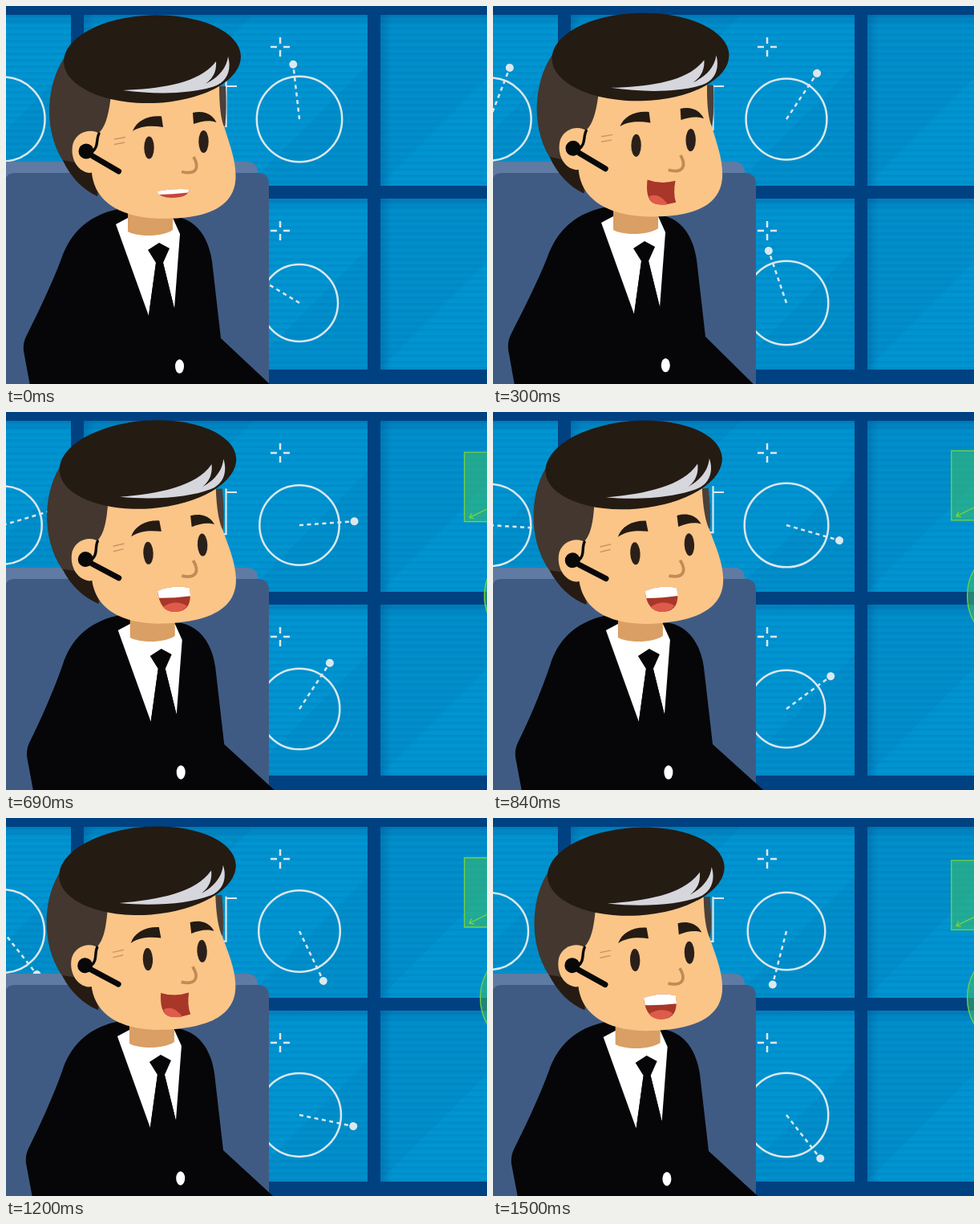
Animation, 600 px wide and 471 px high, one loop 1.53 s. Source, as an HTML page:

```html
<!DOCTYPE html>
<html lang="en">
<head>
<meta charset="utf-8">
<title>Control room call</title>
<style>
html, body { margin: 0; width: 100%; height: 100%; overflow: hidden; background: #004182; }
svg { display: block; width: 600px; height: 471px; }
</style>
</head>
<body>
<svg viewBox="0 0 600 471" xmlns="http://www.w3.org/2000/svg">
  <defs>
    <pattern id="scan" width="8" height="8" patternUnits="userSpaceOnUse">
      <rect width="8" height="3" y="2" fill="#0070b4" opacity=".2"/>
      <rect width="8" height="1" y="5" fill="#0070b4" opacity=".1"/>
    </pattern>
    <linearGradient id="shadeX"><stop stop-color="#00508f" stop-opacity=".35"/><stop offset="1" stop-color="#00508f" stop-opacity="0"/></linearGradient>
    <linearGradient id="shadeY" x2="0" y2="1"><stop stop-color="#00508f" stop-opacity=".3"/><stop offset="1" stop-color="#00508f" stop-opacity="0"/></linearGradient>
    <clipPath id="panes"><path d="M-273 11H81V224H-273ZM97 11H451V224H97ZM467 11H821V224H467ZM-273 240H81V453H-273ZM97 240H451V453H97ZM467 240H821V453H467Z"/></clipPath>
  </defs>

  <rect width="600" height="471" fill="#004182"/>
  <g id="wall" clip-path="url(#panes)"></g>

  <g id="screens" fill="none" stroke="#dce8ee" stroke-width="2.5">
    <path d="M330 51h8m8 0h8M342 39v8m0 8v8M330 280h8m8 0h8M342 268v8m0 8v8"/>
    <path id="bracket" stroke-width="2.2"/>
  </g>

  <g fill="#3cbf68" fill-opacity=".55" stroke="#78d33c" stroke-width="1.300">
    <g id="card">
      <path d="M0 0H80V86.500H0Z"/>
      <path d="M6 81.500L36 67M6 81.500l3-5.500M6 81.500l6 1" fill="none"/>
    </g>
    <circle id="disc" cx="656.600"/>
  </g>

  <path d="M0 194H300Q314 194 314 208V230H0Z" fill="#5f7ba4"/>
  <path d="M-1 471V220Q-1 208 11 208H314Q328 208 328 222V471Z" fill="#405b83"/>

  <path id="jacket" fill="#060608"/>
  <g id="shirt">
    <path d="M137 272L152 264H208L217 284L210 377L196 320H187L178 386Z" fill="#fff"/>
    <path d="M152 250H208V279C196 288 164 288 152 281Z" fill="#d99f64"/>
    <path d="M177 304L191 295L204 302L196 320L210 377L206 392H177L187 320Z" fill="#060608"/>
  </g>
  <ellipse id="button" rx="5.500" ry="8.700" fill="#fff"/>

  <g id="head">
    <path d="M76 60C52 90 44 150 71 193C81 212 96 228 114 237L140 180V90Z" fill="#43372f"/>
    <path d="M71 192C80 213 96 229 114 237L112 200Z" fill="#261b13"/>
    <path d="M258 100H274C275 120 275 136 273 151L262 140Z" fill="#4b4039"/>
    <path d="M132 100H266C266 125 268 142 273 153C279 173 286.500 191 286.500 212C286.500 250 252 265 196 265C148 265 111 247 107 208L114 160C124 152 129 136 132 100Z" fill="#fbc588"/>
    <path d="M118 160C108 152 90 155 84 170C79 186 87 206 104 208L118 206Z" fill="#fbc588"/>
    <ellipse cx="182.500" cy="66.200" rx="110.500" ry="54.800" transform="rotate(-2 182.500 66)" fill="#241b13"/>
    <path d="M146 105C195 103 242 96 262 69C263 83 257 91 249 97C263 90 275 79 277 63C282 80 275 95 260 100C234 109 190 111 146 105Z" fill="#d6d6dd"/>
    <g id="brows" fill="#241b13">
      <path d="M158 156C163 143 177 136 194 137.500L196 151C182 149 169 149 158 156Z"/>
      <path d="M233 133C246 130 257 134 262.500 145C254 142 245 143 234 147Z"/>
    </g>
    <ellipse cx="178.500" cy="176.500" rx="6.200" ry="14" fill="#2a2019"/>
    <ellipse cx="246.500" cy="169" rx="6.200" ry="14" fill="#2a2019"/>
    <path d="M234 188C242 202 237 211 219 206.500" fill="none" stroke="#c18b53" stroke-width="3.800"/>
    <path d="M135 166L149 163.500M135 172.500L148 170" stroke="#c99663" stroke-width="1.500"/>
    <g fill="none" stroke="#080808" stroke-linecap="round">
      <path d="M116 159C112 166 116 176 107 182" stroke-width="3.400"/>
      <path d="M108 187L140.500 206" stroke-width="7"/>
    </g>
    <circle cx="100" cy="181" r="9.500" fill="#080808"/>

    <g class="mouth">
      <path d="M188 231Q208 227 229 228.500Q227 239 207 239Q192 239 188 231Z" fill="#c4473a"/>
      <path d="M188 231Q208 227 229 228.500L227 232.500Q208 234.500 191 235Z" fill="#fff"/>
    </g>
    <g class="mouth">
      <path d="M193 219Q210 225 228 220Q225 236 229 247Q206 253 198 246Q191 239 193 219Z" fill="#a83629"/>
      <path d="M195 240Q206 234 217 247Q219 249 218 250Q203 251 198 246Z" fill="#de5b4b"/>
    </g>
    <g class="mouth"><ellipse cx="214" cy="235" rx="7.500" ry="15.500" fill="#a6342a"/></g>
    <g class="mouth">
      <path d="M188 224Q208 217 228 222Q232 251 210 251Q190 251 188 224Z" fill="#a83629"/>
      <path d="M194 244Q210 235 224 244Q219 251 210 251Q199 251 194 244Z" fill="#de5b4b"/>
      <path d="M188 224Q208 217 228 222L229 232Q208 234 189.500 233Z" fill="#fff"/>
    </g>
  </g>
</svg>
<script>
const LOOP = 1530, STEP = 30, PULSE = 920;
const $ = id => document.getElementById(id);
const clamp = v => Math.min(1, Math.max(0, v));
const easeOut = v => 1 - (1 - clamp(v)) ** 3;
const wave = (t, peak, period = PULSE) => Math.cos(2 * Math.PI * (t - peak) / period);

function add(parent, tag, attrs) {
  const el = document.createElementNS("http://www.w3.org/2000/svg", tag);
  for (const k in attrs) el.setAttribute(k, attrs[k]);
  return parent.appendChild(el);
}

function buildWall() {
  const wall = $("wall"), rect = (x, y, width, height, fill) =>
    add(wall, "rect", { x, y, width, height, fill });
  for (const y of [11, 240]) for (const x of [-273, 97, 467]) {
    rect(x, y, 354, 213, "#008fca");
    add(wall, "path", {
      d: `M${x + 212} ${y}L${x - 1} ${y + 213}H${x + 204}L${x + 417} ${y}Z`,
      fill: "#00a4e0", opacity: .3
    });
    rect(x, y, 354, 213, "url(#scan)");
    rect(x, y, 14, 213, "url(#shadeX)");
    rect(x, y, 354, 14, "url(#shadeY)");
  }
}

// Radar dials: centre, start angle of the hand, time of largest ring
const dials = [[366, 141, -96.5, 55], [366, 370, -149, 440], [-4, 141, -109, 120]]
  .map(([x, y, angle, peak]) => {
    const g = add($("screens"), "g", { transform: `translate(${x} ${y})` });
    const ring = add(g, "circle", {});
    const hand = add(g, "g", {});
    add(hand, "path", { d: "M0 0H64", "stroke-dasharray": "5 4.500" });
    add(hand, "circle", { cx: 68.7, r: 5, fill: "#dce8ee", stroke: "none" });
    return { ring, hand, angle, peak };
  });

// Smooth curve through keys at the given times
const times = [0, 300, 510, 840, 1080, 1320, 1500];
function track(t, keys) {
  const last = times.length - 1;
  let i = 0;
  while (i < last - 1 && t >= times[i + 1]) i++;
  const slope = n => {
    const a = Math.max(0, n - 1), b = Math.min(last, n + 1);
    return (keys[b] - keys[a]) / (times[b] - times[a]);
  };
  const span = times[i + 1] - times[i], u = clamp((t - times[i]) / span);
  const p = keys[i], q = keys[i + 1], m = slope(i) * span, n = slope(i + 1) * span;
  return p + u * (m + u * (3 * (q - p) - 2 * m - n + u * (2 * (p - q) + m + n)));
}

const pose = {
  tilt: [0, .7, -1.2, -3, -2.6, -2, -1.5],
  headX: [0, -1, 1, 3.5, 2.5, 1.5, 1],
  headY: [0, -2.5, -2, -1.5, -2.5, 0, 0],
  brow: [0, -3, -1, -1, -1, 0, -1],
  lean: [0, -3, 1, 6, 4.5, 1.5, 1],
  rise: [0, -2, -.5, 0, -1, 1, 1]
};

// Mouth shapes: 0 rest, 1 wide, 2 round, 3 teeth
const speech = [[0, 0], [150, 1], [420, 2], [660, 3], [960, 0], [1200, 1], [1410, 3]];
const mouths = [...document.querySelectorAll(".mouth")];

function drawMan(t) {
  const p = {};
  for (const k in pose) p[k] = track(t, pose[k]);
  const b = p.lean, y = p.rise;
  $("jacket").setAttribute("d",
    `M${140 + b * .5} ${253 + y}C${102 + b * .3} ${261 + y} ${80 + b * .2} ${283 + y} ${69 + b * .4} ${315 + y}` +
    `C${57 + b * .6} ${347 + y} ${39 + b} ${384 + y} ${25 + b} ${412 + y}Q${21 + b} ${420 + y} ${22 + b} ${430 + y}` +
    `L${30 + b} 473H${331 + b * 1.4}L${268 + b} ${414 + y}L${257 + b} ${318 + y}` +
    `C${252 + b} ${285 + y} ${236 + b} ${268 + y} ${215 + b} ${263 + y}Z`);
  $("shirt").setAttribute("transform", `translate(${b * .65} ${y})`);
  $("button").setAttribute("transform", `translate(${216.5 + b * .4} ${449 + y * .7})`);
  $("head").setAttribute("transform", `translate(${p.headX} ${p.headY}) rotate(${p.tilt} 200 265)`);
  $("brows").setAttribute("transform", `translate(0 ${p.brow})`);
  const shape = speech.filter(s => s[0] <= t).pop()[1];
  mouths.forEach((m, i) => m.setAttribute("visibility", i === shape ? "visible" : "hidden"));
}

function drawScreens(t) {
  for (const d of dials) {
    d.ring.setAttribute("r", 50.7 + 2.7 * wave(t, d.peak));
    d.hand.setAttribute("transform", `rotate(${d.angle + t * .134})`);
  }
  const k = wave(t, 440);
  $("bracket").setAttribute("d",
    `M274.5 ${96 + 4 * k}V${152.5 + 2.5 * k}H266M274 100H288`);

  const x = 571.8 + 40 * (1 - easeOut((t - 390) / 120));
  const skew = 8 * clamp((600 - t) / 90);
  const top = 50.3 + 2.6 * wave(t, 395, 1150);
  const card = $("card");
  card.setAttribute("transform", `translate(${x} ${top}) skewY(${skew})`);
  card.setAttribute("opacity", clamp((t - 390) / 90));

  const disc = $("disc");
  disc.setAttribute("r", 65 * easeOut((t - 570) / 210));
  disc.setAttribute("cy", 224 + 5 * clamp((1080 - t) / 240));
}

function frame(now) {
  const t = Math.floor((now % LOOP) / STEP) * STEP;
  drawScreens(t);
  drawMan(t);
}

buildWall();
const start = performance.now();
function tick() {
  frame(performance.now() - start);
  requestAnimationFrame(tick);
}
tick();
</script>
</body>
</html>
```
